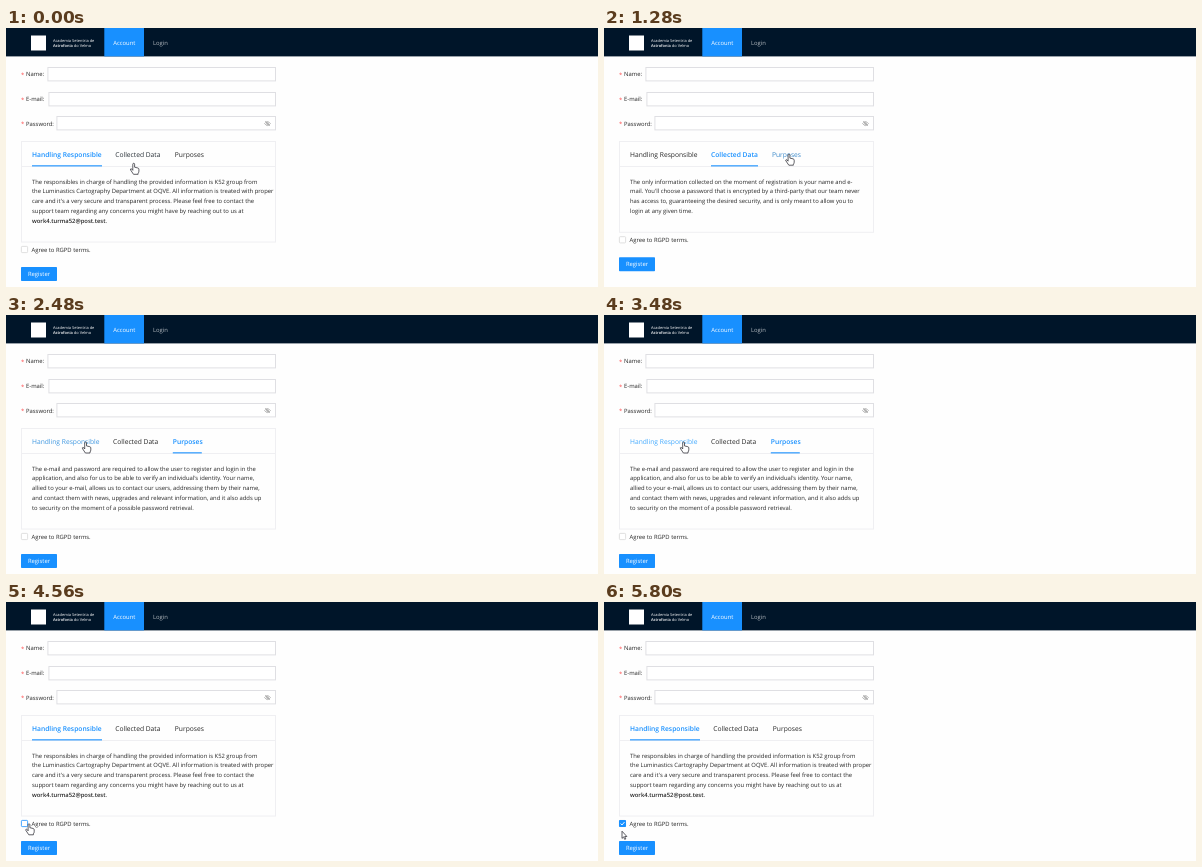
Recreate the animation shown at these times as an HTML page. Size 592 by 259 pixels, loop 5.88 s.

```html
<!DOCTYPE html>
<html lang="en">
<head>
<meta charset="utf-8">
<title>Account registration</title>
<style>
  html, body { margin: 0; width: 100%; height: 100%; overflow: hidden; background: #fefefe; }
  svg { display: block; width: 592px; height: 259px; }
  text { font: 5.86px "Open Sans", "Noto Sans", sans-serif; fill: #262626; text-rendering: geometricPrecision; white-space: pre; }
  .bold { font-weight: 600; }
  .white { fill: #fff; }
  .mid { text-anchor: middle; }
  #brand text { font-size: 3.95px; fill: #fff; }
  #tabs text { font-size: 6.69px; }
  .star { fill: #ff4d4f; }
  .field { fill: #fff; stroke: #dfdfe3; }
  .blue { fill: #1890ff; }
  .line { fill: none; stroke: #efeff2; }
  #cursor path { fill: #fff; stroke: #2b2b33; stroke-width: .75; stroke-linejoin: round; }
</style>
</head>
<body>
<svg viewBox="0 0 592 259">
  <rect width="592" height="28.4" fill="#001529"/>
  <g id="brand">
    <rect class="white" x="25" y="7.5" width="15" height="15"/>
    <text x="47" y="13.7">Academia Setentria de</text>
    <text x="47" y="18.5"><tspan class="bold">Astrofonia</tspan> do Velmo</text>
  </g>
  <rect class="blue" x="98.3" width="39.7" height="28.4"/>
  <text class="white mid" x="118.3" y="16.8">Account</text>
  <text class="white" x="147" y="16.8" opacity=".7">Login</text>

  <g id="fields"></g>
  <g fill="none" stroke="#8c8c8c" stroke-width=".6">
    <path d="M258.6 95.6q2.9-4 5.8 0q-2.9 4-5.8 0zM259.2 93l4.7 5"/>
    <circle cx="261.5" cy="95.6" r=".9"/>
  </g>

  <rect id="card" class="line" x="15.5" y="113.5" width="254" height="100.5"/>
  <path class="line" d="M15 138.5H270"/>
  <g id="tabs">
    <text y="129.1">Handling Responsible</text>
    <text y="129.1">Collected Data</text>
    <text y="129.1">Purposes</text>
  </g>
  <rect id="ink" class="blue" y="137.3" height="1.1"/>
  <g id="panels"></g>

  <g id="footer">
    <rect id="wave" x="15.2" y="218.2" width="6.6" height="6.6" rx=".8" fill="none" stroke="#1890ff" stroke-width=".6"/>
    <rect id="box" x="15.4" y="218.4" width="6.2" height="6.2" rx=".8" fill="#fff" stroke-width=".8"/>
    <g id="check">
      <rect class="blue" x="15" y="218" width="7" height="7" rx=".8"/>
      <path d="M16.6 221.5l1.4 1.5l2.5-3" fill="none" stroke="#fff" stroke-width=".9"/>
    </g>
    <text x="25.5" y="223.6">Agree to RGPD terms.</text>
    <rect class="blue" x="15" y="239" width="36" height="14" rx=".8"/>
    <text class="white mid" x="33" y="248.1">Register</text>
  </g>

  <g id="cursor">
    <path d="M-.9 6.2V.9a.9.9 0 0 1 1.8 0v3l3.3.8q1 .3 1 1.2v2q0 1.2-.8 2.1v1H-.2L-3 6.8q-.8-1.2.3-1.4q.9 0 1.8 1.6z"/>
    <path d="M0 0V7.2L1.6 5.7L2.7 8.2L3.8 7.7L2.7 5.3H4.9z"/>
  </g>
</svg>
<script>
const LOOP = 5880, LINE = 9.7;
const CLICKS = [500, 1480, 3520], CHECKED = 4860;
const DARK = [38, 38, 38], HOVER = [64, 169, 255], ACTIVE = [24, 144, 255];
const $ = id => document.getElementById(id);

const PANELS = [
  ["The responsibles in charge of handling the provided information is K52 group from",
   "the Luminastics Cartography Department at OQVE. All information is treated with proper",
   "care and it's a very secure and transparent process. Please feel free to contact the",
   "support team regarding any concerns you might have by reaching out to us at",
   '<tspan class="bold">work4.turma52@post.test</tspan>.'],
  ["The only information collected on the moment of registration is your name and e-",
   "mail. You'll choose a password that is encrypted by a third-party that our team never",
   "has access to, guaranteeing the desired security, and is only meant to allow you to",
   "login at any given time."],
  ["The e-mail and password are required to allow the user to register and login in the",
   "application, and also for us to be able to verify an individual's identity. Your name,",
   "allied to your e-mail, allows us to contact our users, addressing them by their name,",
   "and contact them with news, upgrades and relevant information, and it also adds up",
   "to security on the moment of a possible password retrieval."]
];

$("panels").innerHTML = PANELS.map(lines => "<g>" + lines.map((line, i) =>
  `<text x="26" y="${155.7 + i * LINE}">${line}</text>`).join("") + "</g>").join("");

$("fields").innerHTML = [["Name", 42], ["E-mail", 43], ["Password", 51]].map(([label, x], i) => {
  const y = 39 + i * 24.7;
  return `<text class="star" x="15" y="${y + 10}">*</text>
    <text x="20" y="${y + 9.2}">${label}:</text>
    <rect class="field" x="${x - .1}" y="${Math.round(y) + .5}" width="${269.6 - x}" height="13.4"/>`;
}).join("");

// Tracks hold steps of [start, duration, ...values]; the first step is the initial state.
const inkTrack = [[0, 1, 26, 70], [CLICKS[0], 300, 107, 47], [CLICKS[1], 300, 166.8, 29], [CLICKS[2], 300, 26, 70]];
const cursorTrack = [[0, 1, 127.7, 135.3], [0, 450, 133.5, 127.6], [700, 500, 185, 126.2],
  [1860, 500, 79.6, 127], [3680, 420, 23, 221.8], [5200, 400, 18, 229.2]];
const colorTracks = [
  [[0, 1, ...ACTIVE], [CLICKS[0], 300, ...DARK], [2280, 300, ...HOVER], [CLICKS[2], 300, ...ACTIVE]],
  [[0, 1, ...DARK], [-80, 300, ...HOVER], [CLICKS[0], 300, ...ACTIVE], [CLICKS[1], 300, ...DARK]],
  [[0, 1, ...DARK], [1100, 300, ...HOVER], [CLICKS[1], 300, ...ACTIVE], [CLICKS[2], 300, ...DARK]]
];

const clamp = p => Math.min(1, Math.max(0, p));
const ease = p => p < .5 ? 4 * p ** 3 : 1 - (2 - 2 * p) ** 3 / 2;
const at = (track, t) => track.reduce((from, [start, duration, ...to]) => {
  const p = ease(clamp((t - start) / duration));
  return from.map((v, i) => v + (to[i] - v) * p);
}, track[0].slice(2));

function set(el, attrs) {
  for (const key in attrs) el.setAttribute(key, attrs[key]);
}

function render(t) {
  const clicks = CLICKS.filter(c => t >= c).length;
  const active = clicks % 3;
  const settled = clicks === 0 || t >= CLICKS[clicks - 1] + 280;
  const bold = settled ? active : -1;
  const tabX = [26, bold === 0 ? 109.2 : 107, [168.8, 167.9][bold] ?? 166.8];

  [...$("tabs").children].forEach((tab, i) => set(tab, {
    x: tabX[i],
    style: `fill: rgb(${at(colorTracks[i], t).map(Math.round)})`,
    class: i === bold ? "bold" : ""
  }));
  [...$("panels").children].forEach((panel, i) => set(panel, { display: i === active ? "inline" : "none" }));

  const [inkX, inkWidth] = at(inkTrack, t);
  set($("ink"), { x: inkX, width: inkWidth });

  const missing = 5 - PANELS[active].length;
  set($("card"), { height: 100.5 - missing * LINE });
  set($("footer"), { transform: `translate(0 ${-missing * LINE})` });

  const [x, y] = at(cursorTrack, t);
  const onLabel = y > 216 && y < 227 && x < 86;
  const pointing = y < 138 || onLabel;
  const [hand, arrow] = $("cursor").children;
  set($("cursor"), { transform: `translate(${x} ${y})` });
  set(hand, { display: pointing ? "inline" : "none" });
  set(arrow, { display: pointing ? "none" : "inline" });

  const wave = clamp((t - CHECKED) / 360);
  set($("box"), { stroke: onLabel ? "#1890ff" : "#d9d9d9" });
  set($("check"), { opacity: clamp((t - CHECKED) / 200) });
  set($("wave"), {
    opacity: wave > 0 ? .5 * (1 - wave) : 0,
    transform: `translate(18.5 221.5) scale(${1 + .6 * wave}) translate(-18.5 -221.5)`
  });
}

const begin = performance.now();
function tick() {
  render((performance.now() - begin) % LOOP);
  requestAnimationFrame(tick);
}
tick();
</script>
</body>
</html>
```
